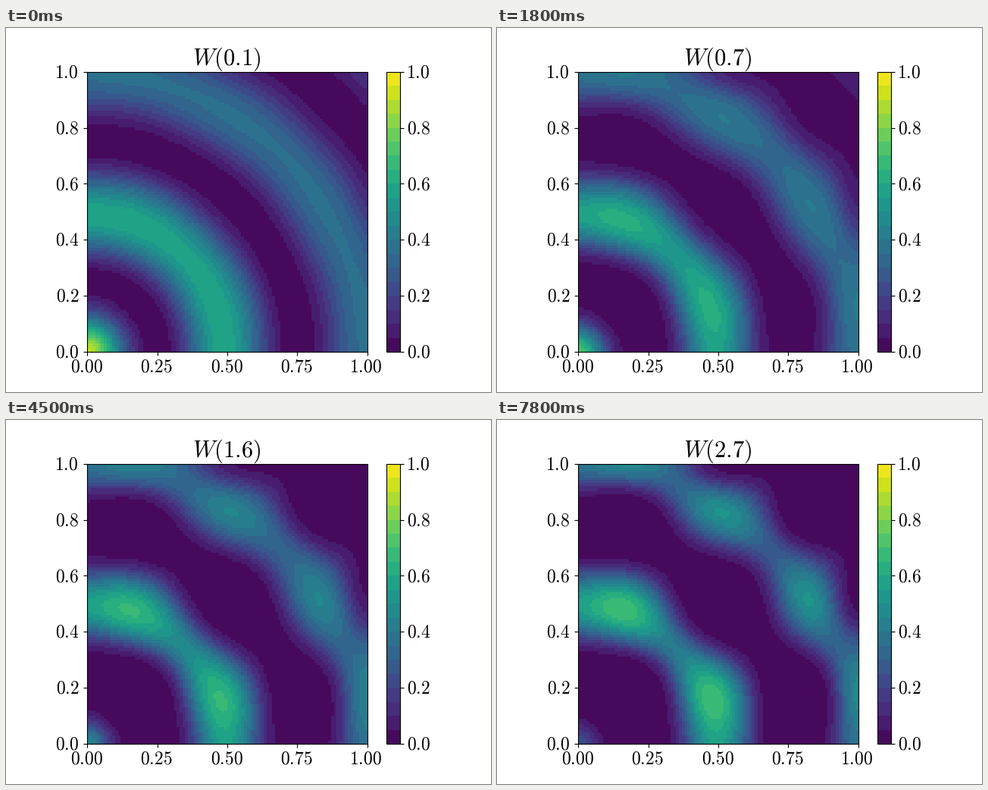
A matplotlib script that plays this animation: 640 px wide and 480 px high, repeating every 8 s.

```python
import matplotlib.pyplot as plt
import numpy as np
from matplotlib.animation import FuncAnimation
from matplotlib.colors import ListedColormap

plt.rcParams["mathtext.fontset"] = "cm"

WIDTH, HEIGHT, DPI = 640, 480, 100
CELLS = 100
BANDS = 20
STATES = 27
TICKS_PER_STATE = 3
LABEL_SIZE, TITLE_SIZE = 17, 22

DIFFUSION = 0.0006
GROWTH_W, KILL_W, HARM_W = 0.4, 3.5, 0.2
GROWTH_V, KILL_V = 1.2, 2.5


def laplacian(field):
    """Five-point Laplacian with zero-flux edges."""
    p = np.pad(field, 1, mode="edge")
    return (p[2:, 1:-1] + p[:-2, 1:-1] + p[1:-1, 2:] + p[1:-1, :-2]
            - 4 * field) * CELLS ** 2


def patch_wave(s):
    s = np.hypot(s, 0.04)
    return np.sin(np.pi * s * (3 + 0.45 * s ** 8))


def simulate():
    """Two competitors on interleaved rings; a patchwork favours one or the other."""
    axis = (np.arange(CELLS) + 0.5) / CELLS
    x, y = np.meshgrid(axis, axis)
    r = np.hypot(x, y)
    patch = patch_wave(x) * patch_wave(y)
    w = 0.96 * np.exp(-r) * np.cos(2 * np.pi * r) ** 2
    v = np.exp(-r) * np.sin(2 * np.pi * r) ** 2 * (1 + patch)
    steps = 10
    dt = 0.1 / steps
    states = []
    for _ in range(STATES):
        for _ in range(steps):
            rate_w = GROWTH_W * (1 - w) - KILL_W * v - HARM_W * (1 + patch)
            rate_v = GROWTH_V * (0.2 + patch - v) - KILL_V * w
            dw = DIFFUSION * laplacian(w) + w * rate_w
            dv = DIFFUSION * laplacian(v) + v * rate_v
            w, v = w + dt * dw, v + dt * dv
        states.append(w)
    return states


states = simulate()
band_centres = (np.arange(BANDS) + 0.5) / BANDS
cmap = ListedColormap(plt.get_cmap("viridis")(band_centres))

fig, ax = plt.subplots(figsize=(WIDTH / DPI, HEIGHT / DPI), dpi=DPI)
image = ax.imshow(states[0], origin="lower", extent=(0, 1, 0, 1), cmap=cmap,
                  vmin=0, vmax=1, interpolation="nearest")
bar = fig.colorbar(image, ax=ax)

fifths = np.linspace(0, 1, 6)
quarters = np.linspace(0, 1, 5)
ax.set_xticks(quarters, labels=[])
ax.set_yticks(fifths, labels=[])
bar.set_ticks(fifths, labels=[])


def put(px, py, text, align, size=LABEL_SIZE):
    """Place math text with its baseline at a pixel counted from the top left."""
    return fig.text(px / WIDTH, 1 - py / HEIGHT, f"${text}$", ha=align,
                    va="baseline", fontsize=size)


LEFT, BOTTOM, SIDE = 107.2, 427.2, 369.6
for q in quarters:
    put(LEFT + SIDE * q - (2 if q == 1 else 1), 453.4, f"{q:.2f}", "center")
for f in fifths:
    nudge = 2 if f == 1 else 1
    baseline = BOTTOM - SIDE * f + 7.6
    put(97.5 - nudge, baseline, f"{f:.1f}", "right")
    put(530 - nudge, baseline, f"{f:.1f}", "left")
title = put(291, 48.8, "W(0.1)", "center", TITLE_SIZE)


def update(tick):
    index = min(tick // TICKS_PER_STATE, STATES - 1)
    image.set_data(states[index])
    title.set_text(f"$W({0.1 * (index + 1):.1f})$")
    return image, title


anim = FuncAnimation(fig, update, frames=80, interval=100, repeat=True,
                     repeat_delay=0, blit=False)
plt.show()
```
